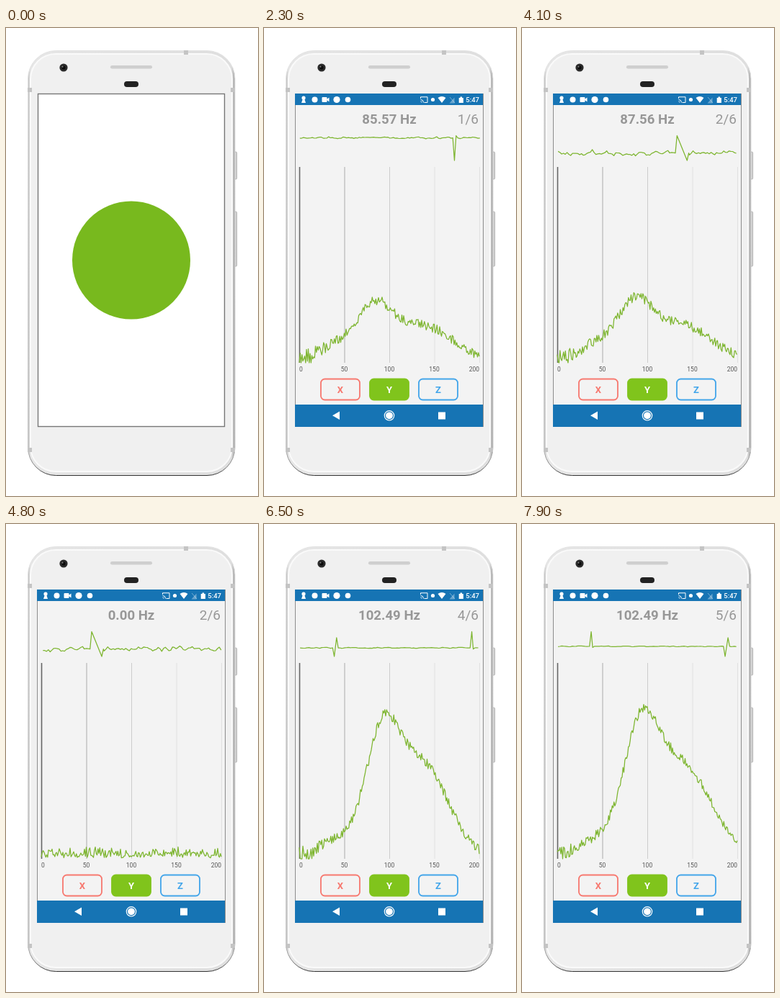
Write an HTML page that moves like this. It is 350 px wide and 650 px high and loops after 8 s.

```html
<!DOCTYPE html>
<html lang="en">
<head>
<meta charset="utf-8">
<title>Frequency meter</title>
<style>
html, body { margin: 0; width: 100%; height: 100%; overflow: hidden; background: #fff; }
svg { display: block; width: 100vw; height: 100vh; }
text { font-family: Roboto, Arial, sans-serif; }
.line { fill: none; stroke: #7db52f; stroke-width: 1.25; stroke-linejoin: round; }
#axis text { font-size: 8.5px; fill: #555; }
#keys rect { stroke-width: 1.8; }
#keys text { font-size: 13px; font-weight: 700; text-anchor: middle; }
</style>
</head>
<body>
<svg viewBox="0 0 350 650">
  <defs>
    <linearGradient id="rim">
      <stop offset="0" stop-color="#bbb"/><stop offset=".012" stop-color="#e6e6e6"/>
      <stop offset=".983" stop-color="#dedede"/><stop offset="1" stop-color="#a0a0a0"/>
    </linearGradient>
    <linearGradient id="edge" x2="0" y2="1">
      <stop offset="0" stop-color="#e2e2e2"/><stop offset=".93" stop-color="#c4c4c4"/>
      <stop offset=".98" stop-color="#777"/><stop offset="1" stop-color="#333"/>
    </linearGradient>
  </defs>

  <!-- phone -->
  <g fill="#d2d2d2" stroke="#a4a4a4" stroke-width=".8">
    <rect x="315" y="172" width="5.6" height="38" rx="1.5"/>
    <rect x="315" y="255" width="5.6" height="76" rx="1.5"/>
  </g>
  <rect x="30.5" y="31.5" width="287.5" height="590" rx="39" fill="url(#rim)" stroke="url(#edge)"/>
  <rect x="34" y="36" width="280" height="580" rx="35" fill="#f0f0f0" stroke="#fafafa" stroke-width="2"/>
  <g fill="#c4c4c4">
    <rect x="30" y="83" width="6" height="6"/><rect x="312" y="83" width="6" height="6"/>
    <rect x="30" y="583" width="6" height="6"/><rect x="312" y="583" width="6" height="6"/>
    <rect x="247" y="31" width="6" height="6"/>
  </g>
  <circle cx="80" cy="55" r="5.6" fill="#2a2a2a"/>
  <circle cx="80" cy="55" r="2.6" fill="#0c0c0c"/>
  <circle cx="78.5" cy="53.8" r="1" fill="#888"/>
  <rect x="145" y="52" width="58" height="4.5" rx="2.2" fill="#cfcfcf"/>
  <rect x="164" y="74" width="20" height="8" rx="4" fill="#222"/>

  <g id="splash">
    <rect x="44.5" y="91.5" width="259" height="462" fill="#fff" stroke="#777" stroke-width="1.4"/>
    <circle cx="174" cy="322.5" r="82" fill="#78b91e"/>
  </g>

  <g id="app">
    <rect x="43.5" y="91.5" width="261" height="462" fill="#f3f3f3" stroke="#8c8c8c"/>
    <path d="M43 91h261v16H43zM43 523h261v31H43z" fill="#1674b4"/>

    <!-- status bar -->
    <g fill="#fff">
      <circle cx="55" cy="97" r="2.6"/><path d="M54 98h2l2 6h-6z"/>
      <circle cx="70.5" cy="99.5" r="4"/>
      <rect x="80.5" y="96" width="7" height="7" rx="1"/><path d="M87 99l3.5-2.5v6L87 100z"/>
      <circle cx="101" cy="99.5" r="4.6"/>
      <circle cx="116.5" cy="99.5" r="3.8"/>
      <circle cx="234.5" cy="99.5" r="2.6"/>
      <path d="M241.5 97q5.5-4 11 0l-5.5 7z"/>
      <path d="M270.7 97h1.8v-1.4h2.6v1.4h1.8v7h-6.2z"/>
      <path d="M257.5 104.5l7-8v8z" opacity=".35"/>
    </g>
    <g fill="none" stroke="#fff">
      <path d="M217.5 98v-2.200h9.5v7.7h-4.5M217.5 99.5q4 0 4 4M217.5 102q1.5 0 1.5 1.5"/>
      <path d="M258 96l7 8" opacity=".4"/>
    </g>
    <text x="299" y="103" font-size="9.5" font-weight="500" fill="#fff" text-anchor="end">5:47</text>

    <text id="hz" x="174" y="133" font-size="18.6" font-weight="700" fill="#979797" text-anchor="middle"></text>
    <text id="count" x="298" y="133" font-size="19" fill="#979797" text-anchor="end"></text>

    <g id="axis"></g>
    <path id="trace" class="line"/>
    <path id="spectrum" class="line"/>
    <g id="keys"></g>

    <!-- navigation -->
    <path d="M95 538.3l10-5.8v11.6z" fill="#fff"/>
    <circle cx="174" cy="538.3" r="6.7" fill="none" stroke="#fff" stroke-width="1.2"/>
    <circle cx="174" cy="538.3" r="4.9" fill="#fff"/>
    <rect x="242" y="533.5" width="10" height="10" fill="#fff"/>
  </g>
</svg>

<script>
const LOOP = 8000, STEP = 100, SPLASH = 1300;
const LEFT = 49, RIGHT = 299, FLOOR = 465, PX_PER_HZ = 1.25;
const el = id => document.getElementById(id);

// at: strip position of the upward spike; lag: distance from it to the downward one.
// centre, peak, tail and spread shape the spectrum.
const TAPS = [
  { at: 572, up: .1, down: 1, lag: -2.3, hz: 85.57, centre: 85, peak: 58, tail: 52, spread: 36 },
  { at: 762.7, up: .3, down: .13, lag: 14, hz: 87.56, centre: 87, peak: 62, tail: 54, spread: 36 },
  { at: 978.2, up: 1, down: .85, lag: -3.2, hz: 90.55, centre: 90, peak: 94, tail: 82, spread: 38 },
  { at: 1166, up: 1.6, down: .12, lag: 2, hz: 102.49, centre: 92, peak: 144, tail: 133, spread: 30 },
  { at: 1356, up: .95, down: 1.1, lag: -4, hz: 102.49, centre: 92, peak: 138, tail: 136, spread: 34 }
];

const rand = n => {
  const v = Math.sin(n * 127.1 + 11.7) * 43758.5453;
  return v - Math.floor(v);
};
const mix = (a, b, k) => a + (b - a) * k;
const smooth = x => {
  const i = Math.floor(x), f = x - i;
  return mix(rand(i), rand(i + 1), f * f * (3 - 2 * f));
};
const bell = (x, centre, width) => Math.exp(-.5 * ((x - centre) / width) ** 2);
const toPath = pts => "M" + pts.map(p => p[0].toFixed(1) + " " + p[1].toFixed(1)).join("L");

function spike({ at, up, down, lag }) {
  const a = Math.min(0, lag) - 2.3, b = Math.max(0, lag) + 2.3;
  return [[at + a, 0], [at, up], [at + lag, -down], [at + b, 0]].sort((p, q) => p[0] - q[0]);
}

function buildStrip() {
  const spikes = TAPS.map(spike), pts = spikes.flat();
  for (let x = 200; x < 1400; x += 2.5) {
    if (spikes.some(s => x > s[0][0] - 1 && x < s[3][0] + 1)) continue;
    pts.push([x, .08 * (smooth(x / 5) - .5) + .04 * (rand(x) - .5)]);
  }
  return pts.sort((p, q) => p[0] - q[0]);
}
const strip = buildStrip();

// The strip runs slightly faster after the first 3.4 s.
const scrollAt = n => 13.27 * n + .48 * Math.max(0, n - 34);

function drawTrace(scroll) {
  const seen = strip.filter(([x]) => x >= scroll + LEFT && x <= scroll + RIGHT + 1);
  const levels = seen.map(p => p[1]);
  const hi = Math.max(...levels), lo = Math.min(...levels);
  el("trace").setAttribute("d", toPath(seen.map(([x, v]) => [x - scroll, 149.5 + (hi - v) / (hi - lo) * 34.5])));
}

function drawSpectrum(tap, n) {
  const pts = [];
  for (let f = 0; f <= 200; f++) {
    const r = rand(f + n * 311);
    let h = 1 + 12 * r * r + 4 * rand(f * 3 + n * 97);
    if (tap) {
      h = tap.peak * bell(f, tap.centre, 18) + tap.tail * bell(f, 135, tap.spread)
        + 27 * bell(f, 48, 25) + (r - .5) * mix(13, 24, bell(f, 0, 18));
    }
    pts.push([LEFT + f * PX_PER_HZ, FLOOR - Math.max(0, h)]);
  }
  el("spectrum").setAttribute("d", toPath(pts));
}

function drawAxis() {
  const shades = ["#666", "#aaa", "#ccc", "#e0e0e0", "#e0e0e0"];
  el("axis").innerHTML = shades.map((shade, i) => {
    const x = LEFT + .5 + i * 62.5;
    const anchor = i === 0 ? "start" : i === 4 ? "end" : "middle";
    return `<path d="M${x} 193V${FLOOR}" stroke="${shade}" stroke-width="${i ? 1 : 1.6}"/>
      <text x="${x - .5}" y="477" text-anchor="${anchor}">${i * 50}</text>`;
  }).join("");
}

function drawKeys() {
  const colors = { X: "#f7786f", Y: "#80c41c", Z: "#42a5ea" };
  el("keys").innerHTML = Object.entries(colors).map(([name, color], i) => {
    const x = 79 + i * 68, on = name === "Y";
    return `<rect x="${x}" y="487.5" width="54" height="29" rx="5.5" fill="${on ? color : "none"}" stroke="${color}"/>
      <text x="${x + 27}" y="506.6" fill="${on ? "#fff" : color}">${name}</text>`;
  }).join("");
}

function draw(n) {
  const splash = n * STEP < SPLASH;
  el("splash").style.display = splash ? "" : "none";
  el("app").style.display = splash ? "none" : "";
  if (splash) return;
  const scroll = scrollAt(n);
  const hits = TAPS.filter(t => t.at - scroll < 296);
  const live = hits.slice(-1).find(t => t.at - scroll > 160);
  el("hz").textContent = (live ? live.hz : 0).toFixed(2) + " Hz";
  el("count").textContent = hits.length + "/6";
  drawTrace(scroll);
  drawSpectrum(live, n);
}

let start = null, shown = 0;
function tick(now) {
  start ??= now;
  const n = Math.floor((now - start) % LOOP / STEP);
  if (n !== shown) draw(n);
  shown = n;
  requestAnimationFrame(tick);
}
drawAxis();
drawKeys();
draw(0);
requestAnimationFrame(tick);
</script>
</body>
</html>
```
